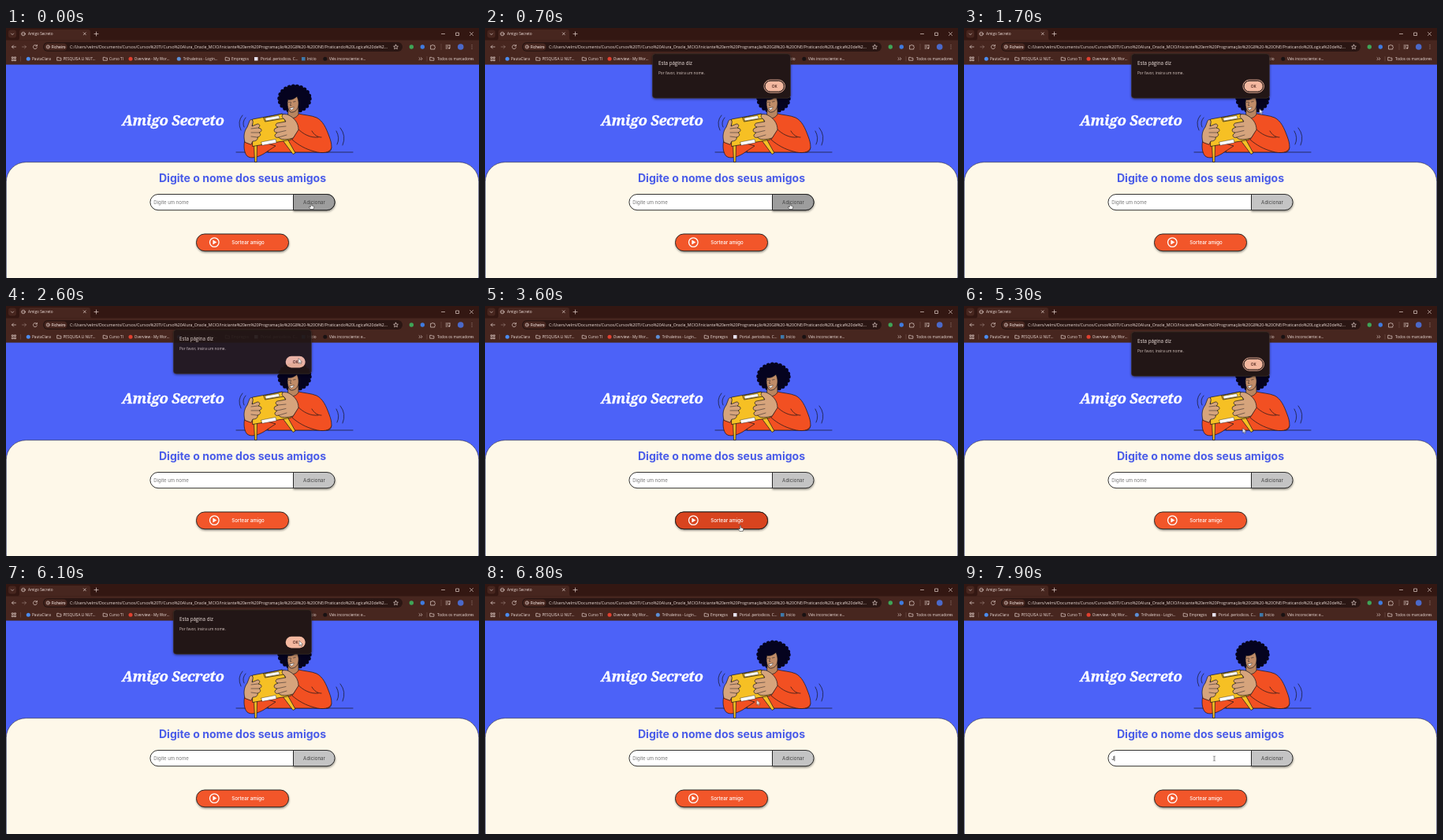
Recreate the animation shown at these times as an HTML page. Size 600 by 318 pixels, loop 8 s.

```html
<!DOCTYPE html>
<html lang="pt">
<head>
<meta charset="utf-8">
<title>Amigo Secreto</title>
<style>
html, body { margin: 0; width: 100%; height: 100%; overflow: hidden; background: #4c62f8; }
svg { display: block; width: 600px; height: 318px; }
text { font-family: "Open Sans", "Noto Sans", sans-serif; white-space: pre; }
.chrome text { fill: #efdfda; font-size: 4.7px; }
.chrome .url { font-size: 5.2px; }
.page text { font-family: Inter, sans-serif; font-size: 6.2px; }
.page .title { font: italic bold 18.5px "Noto Serif", serif; letter-spacing: -.4px; fill: #fff; stroke: #fff; stroke-width: .3; }
.page .heading { font-size: 14.06px; font-weight: 700; fill: #4a5ce8; }
.line { fill: none; stroke: #e6d3cd; stroke-width: .7; stroke-linecap: round; stroke-linejoin: round; }
.ink { stroke: #15151c; stroke-width: .7; stroke-linejoin: round; stroke-linecap: round; }
.edge { stroke: #1a1a1a; stroke-width: .9; }

.cursor { animation: travel 8s ease-in-out infinite; }
.dialog { animation: dialog 8s linear infinite; }
.flip { animation: 8s step-end infinite; }
.add-hover { animation-name: add-hover; }
.draw-hover { animation-name: draw-hover; }
.ring { animation-name: ring; }
.hand { animation-name: hand; }
.arrow { animation-name: arrow; }
.beam { animation-name: beam; }
.hint { animation-name: hint; }
.typed { animation-name: typed; }
.caret { animation-name: caret; }

@keyframes travel {
  0%, 13.75% { transform: translate(387px, 223px); }
  25%, 33.75% { transform: translate(371px, 66.5px); }
  43.75%, 49% { transform: translate(324px, 279px); }
  53%, 60% { transform: translate(326px, 278px); }
  71.25%, 81.25% { transform: translate(372px, 72px); }
  88.75%, 100% { transform: translate(317.5px, 222px); }
}
@keyframes dialog {
  0%, 6.25%, 33.75%, 50.5%, 82%, 100% { opacity: 0; transform: translateY(-9px); }
  8%, 32.1%, 51.9%, 80.6% { opacity: 1; transform: none; }
  32.5% { opacity: .95; transform: translateY(-3px); }
}
@keyframes add-hover { 0% { opacity: 1; } 15%, 100% { opacity: 0; } }
@keyframes draw-hover { 0%, 61.5% { opacity: 0; } 43% { opacity: 1; } 100% { opacity: 0; } }
@keyframes ring { 0%, 50% { opacity: 1; } 24%, 70% { opacity: 0; } 100% { opacity: 0; } }
@keyframes hand { 0%, 43% { opacity: 1; } 15%, 61.5%, 100% { opacity: 0; } }
@keyframes arrow { 0%, 43%, 88% { opacity: 0; } 15%, 61.5% { opacity: 1; } 100% { opacity: 0; } }
@keyframes beam { 0% { opacity: 0; } 88%, 100% { opacity: 1; } }
@keyframes hint { 0% { opacity: 1; } 96.25%, 100% { opacity: 0; } }
@keyframes typed { 0% { opacity: 0; } 96.25%, 100% { opacity: 1; } }
@keyframes caret {
  0% { opacity: 0; transform: none; }
  90% { opacity: 1; transform: none; }
  96.25%, 100% { opacity: 1; transform: translateX(3.4px); }
}
</style>
</head>
<body>
<svg viewBox="0 0 600 318">
  <defs>
    <path id="folder" d="M-2.4 -1.9h1.8l.7 .8h2.3v3.1h-4.8z" class="line"/>
    <path id="add" d="M364.5 211.5H407A10 10 0 0 1 407 231.7H364.5Z" class="edge"/>
    <rect id="draw" x="241.5" y="262" width="117" height="21.7" rx="10.5" class="edge"/>
    <filter id="soft" x="-10%" y="-20%" width="120%" height="160%">
      <feDropShadow dx=".4" dy="1.6" stdDeviation=".9" flood-color="#000" flood-opacity=".4"/>
    </filter>
    <filter id="lift" x="-10%" y="-20%" width="120%" height="160%">
      <feDropShadow dx="0" dy="1" stdDeviation="1.5" flood-color="#000" flood-opacity=".5"/>
    </filter>
  </defs>

  <g class="page">
    <rect width="600" height="318" fill="#4c62f8"/>
    <text class="title" x="147" y="123.5">Amigo Secreto</text>
    <rect x=".3" y="170.7" width="599.4" height="170" rx="25" fill="#fef8e9" stroke="#2a2a3a" stroke-width=".6"/>

    <!-- woman shaking a box -->
    <g class="ink">
      <path d="M292 158H440" fill="none"/>
      <path d="M357 111C349 113 343 116 341 121L332 158H409C414 156 414 148 410 138C406 127 402 118 394 114C387 111 379 111 371 109Z" fill="#f25022"/>
      <path d="M303 142C301 150 302 159 306 163C311 167 320 164 327 160L342 150L322 144Z" fill="#f25022"/>
      <ellipse cx="366" cy="90" rx="19" ry="15.8" fill="#05031f" stroke="#05031f" stroke-width="5.4" stroke-dasharray="0 5"/>
      <path d="M358 102L357.5 112C360 116 367 116 371 110V98Z" fill="#b9855f"/>
      <path d="M357.5 91C362 92 366 90 369 87C371.5 92 372 98 369.5 103C367 107 361 109 359 105C357 101 356.500 96 357.5 91Z" fill="#c08c68"/>
      <path d="M358.500 94.500l2 -.4M364.500 94l2.600 -.5M361.500 94.500l-1 4h1.400" fill="none" stroke-width=".5"/>
      <path d="M360.200 101.500q3 .5 5 -1q-1 4.200 -4 3.500z" fill="#fff" stroke-width=".4"/>
      <path d="M413 152C412 159 401 160 391 157C380 154 371 149 363 142L370 128C377 135 386 140 396 139" fill="#f25022"/>
      <path d="M388 131C391 136 395 139 400 139" fill="none"/>
      <path d="M314.500 147L315.500 170.500H318L318.500 147ZM351 143L364 160.500L367 159L357 141Z" fill="#f6c024"/>
      <path d="M313 116L351 109L362 142L313 150.500Z" fill="#f6c024"/>
      <path d="M327 114L350 109.200L353 115L329 119Z" fill="#f6c024"/>
      <path d="M329 114.500L346 111.500L347 115L330 118ZM324 145L342 141.500L343 146L325 149.300Z" fill="#fff" stroke-width=".4"/>
      <g fill="#d6a47c">
        <path d="M303 145C301 138 302 131 306 126L309 118C311 115 314 117 313 121L312 125L319 122C322 122 323 125 320 127L323 128C325 130 324 132 321 133C324 135 323 138 319 139C320 142 317 144 313 144L311 148Z"/>
        <path d="M371 129C371 121 366 114 357 110L352 109.500C349 111 350 114 353 116L355 119L344 121C341 122 342 126 345 126L341 128C339 131 341 133 344 133L341 136C341 139 343 140 346 139C348 143 357 142 364 140Z"/>
      </g>
      <path d="M311 128L320 127M311 133L321 133M311 138L319 139M355 125L345 126M355 130.500L344 133M356 136L346 139" fill="none" stroke-width=".5"/>
      <path d="M300 111Q293 119 298 130M304 114Q299 120 302 126M419 131Q424 140 420 148M424 127Q432 137 427 149" fill="none"/>
    </g>

    <text class="heading" x="300" y="196" text-anchor="middle">Digite o nome dos seus amigos</text>

    <use href="#add" fill="#c4c4c4" filter="url(#soft)"/>
    <use class="flip add-hover" href="#add" fill="#9d9d9d"/>
    <path class="edge" d="M364.5 211.5H193A10 10 0 0 0 193 231.7H364.5Z" fill="#fff"/>
    <text class="flip hint" x="187.3" y="224" fill="#757575" style="font-size:6px">Digite um nome</text>
    <text class="flip typed" x="187.3" y="224" fill="#111" style="font-size:6px">J</text>
    <rect class="flip caret" x="187.3" y="218.5" width=".7" height="6.8" fill="#111"/>
    <text x="391" y="224" text-anchor="middle" fill="#444">Adicionar</text>

    <use href="#draw" fill="#f2572c" filter="url(#soft)"/>
    <use class="flip draw-hover" href="#draw" fill="#d8441f"/>
    <circle cx="264.3" cy="272.6" r="5.8" fill="none" stroke="#fff" stroke-width="1.3"/>
    <path d="M262.4 269.6L267.4 272.6L262.4 275.6Z" fill="#fff"/>
    <text x="307" y="275" text-anchor="middle" fill="#fff" font-weight="500">Sortear amigo</text>
  </g>

  <g class="chrome">
    <rect width="600" height="46.6" fill="#47261f"/>
    <rect width="600" height="15.5" fill="#331712"/>
    <path d="M14 15.6Q17 15.6 17 12.5V5Q17 2 20 2H104Q107 2 107 5V12.5Q107 15.6 110 15.6Z" fill="#47261f"/>
    <rect x="3" y="2.5" width="10" height="10" rx="3" fill="#47261f"/>
    <path class="line" d="M6.5 7l1.6 1.6l1.6 -1.6M98.3 5.8l3 3m0 -3l-3 3M114.5 5v5m-2.5 -2.500h5M552.5 7.5h4M588.5 5.5l4 4m0 -4l-4 4M571 6h3.500v3.500h-3.500z"/>
    <g class="line">
      <circle cx="22" cy="7.5" r="2.3"/>
      <path d="M19.8 7.5h4.4" stroke-width=".4"/>
    </g>
    <text x="28" y="9.2">Amigo Secreto</text>

    <path class="line" d="M12.5 24h-5m2 -2l-2 2l2 2M39 22.6a2.5 2.5 0 1 0 .4 2.2m0 -3.4v1.6h-1.6"/>
    <path class="line" d="M20.5 24h5m-2 -2l2 2l-2 2" opacity=".45"/>
    <rect x="47" y="18" width="456" height="12" rx="6" fill="#2a1613"/>
    <rect x="48.5" y="19.5" width="29" height="9" rx="4.5" fill="#47261f"/>
    <circle class="line" cx="53.3" cy="24" r="2.1"/>
    <path class="line" d="M53.3 23.8v1.1M53.3 22.8v.01"/>
    <text x="57.8" y="25.8" font-weight="600">Ficheiro</text>
    <text class="url" x="81" y="25.9">C:/Users/velmi/Documents/Cursos/Cursos%20TI/Curso%20Alura_Oracle_MCIO/Iniciante%20em%20Programação%20G8%20-%20ONE/Praticando%20Logica%20de%2...</text>
    <path class="line" d="M494.5 21.2l.9 1.9l2 .2l-1.5 1.4l.4 2l-1.8 -1l-1.8 1l.4 -2l-1.5 -1.4l2 -.2z"/>
    <circle cx="514.3" cy="24" r="2.7" fill="#3fa557"/>
    <circle cx="528.3" cy="24" r="2.7" fill="#3f7be0"/>
    <path class="line" d="M539 22.2h1.5q.8 -2 1.7 0h1.6v1.6q1.8 .8 0 1.6v1.6h-4.8z"/>
    <path d="M552 20v8" stroke="#72514a" stroke-width=".6"/>
    <path class="line" d="M558 22h5M558 24h2.500M558 26h2M563 22v3.500"/>
    <circle cx="562.2" cy="25.700" r=".9" fill="#e6d3cd"/>
    <circle cx="576.7" cy="24" r="3.8" fill="#4b69c9"/>
    <path class="line" d="M591 21.8v.01M591 24v.01M591 26.2v.01"/>

    <path class="line" d="M7.7 36.9h1.6v1.6h-1.6zM10.9 36.9h1.6v1.6h-1.6zM7.7 40.1h1.6v1.6h-1.6zM10.9 40.1h1.6v1.6h-1.6z"/>
    <path d="M18.5 36v6.5M534 36v6.5" stroke="#72514a" stroke-width=".6"/>
    <circle cx="28.3" cy="39.2" r="2.5" fill="#4b8cf0"/>
    <text x="33" y="41">PautaClara</text>
    <use href="#folder" x="67.5" y="39.2"/><text x="72.5" y="41">PESQUISA LI NUT...</text>
    <use href="#folder" x="126" y="39.2"/><text x="131" y="41">Curso TI</text>
    <circle cx="158" cy="39.2" r="2.5" fill="#e0402f"/><text x="162.8" y="41">Overview - My Wor...</text>
    <circle cx="219.3" cy="39.2" r="2.5" fill="#5c8fd6"/><text x="224.7" y="41">Trilhaletras - Login...</text>
    <use href="#folder" x="281" y="39.2"/><text x="286" y="41">Empregos</text>
    <rect x="315" y="37" width="4.5" height="4.5" fill="#e6e2ee"/><text x="323" y="41">Portal .periodicos. C...</text>
    <rect x="375" y="37" width="4.5" height="4.5" fill="#3d79ab"/><text x="382" y="41">Início</text>
    <circle cx="404.8" cy="39.2" r="2.5" fill="#191213"/><text x="410" y="41">Viés inconsciente: e...</text>
    <path class="line" d="M524 37.7l1.5 1.5l-1.5 1.5M526.5 37.7l1.5 1.5l-1.5 1.5"/>
    <use href="#folder" x="540.5" y="39.2"/><text x="547" y="41">Todos os marcadores</text>
  </g>

  <g class="dialog">
    <rect x="212.3" y="32.8" width="175.2" height="56.4" rx="4" fill="#211614" stroke="#493832" stroke-width=".5" filter="url(#lift)"/>
    <text x="220" y="47.3" font-size="6.2" fill="#f0e2dd">Esta página diz</text>
    <text x="220" y="58.5" font-size="4.75" fill="#d9c8c2">Por favor, insira um nome.</text>
    <rect x="354.7" y="66.8" width="25" height="14.6" rx="7.3" fill="#f4b8a0"/>
    <rect class="flip ring" x="353.9" y="66" width="26.6" height="16.2" rx="8.1" fill="none" stroke="#f4b8a0" stroke-width=".9"/>
    <rect class="flip ring" x="355.1" y="67.2" width="24.2" height="13.8" rx="6.9" fill="none" stroke="#211614" stroke-width="1"/>
    <text x="367.2" y="75.9" text-anchor="middle" font-size="4.9" font-weight="600" fill="#4a2018">OK</text>
  </g>

  <g class="cursor">
    <path class="flip hand" d="M-.7 .4Q0 -.5 .7 .4V3L3 3.5Q4 3.8 3.8 5L3.1 7.6H-.9L-2.7 5Q-2.6 3.8 -1.6 4.4L-.7 5Z" fill="#fff" stroke="#111" stroke-width=".5" stroke-linejoin="round"/>
    <path class="flip arrow" d="M0 0V6.6L1.5 5.2L2.5 7.5L3.6 7L2.6 4.8H4.6Z" fill="#fff" stroke="#111" stroke-width=".4" stroke-linejoin="round"/>
    <path class="flip beam" d="M-1.3 -3Q0 -3 0 -2.3Q0 -3 1.3 -3M0 -2.3V2.3M-1.3 3Q0 3 0 2.3Q0 3 1.3 3" fill="none" stroke="#222" stroke-width=".6"/>
  </g>
</svg>
</body>
</html>
```
